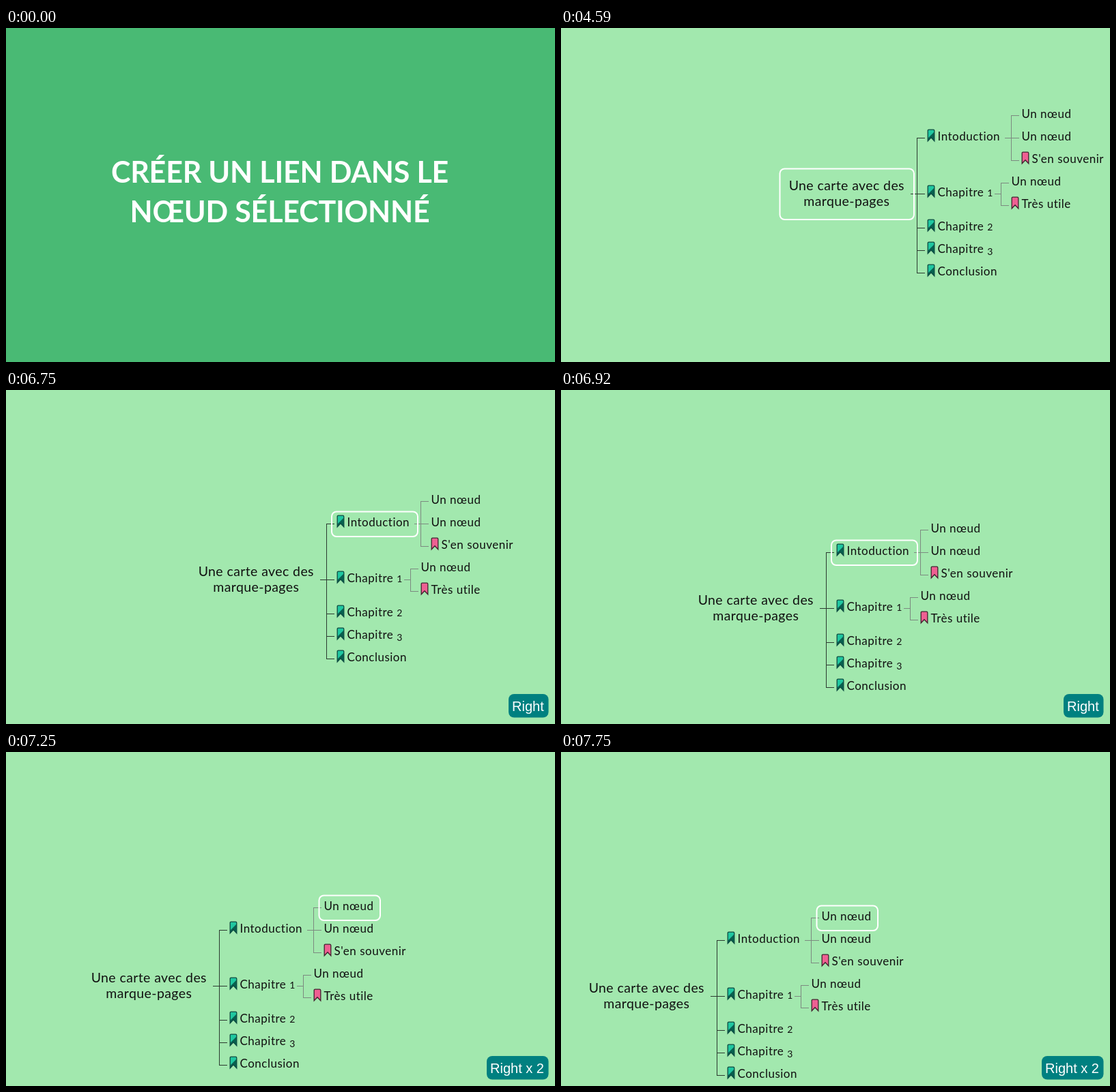
These frames come from a looping animation (804x490 px, 8 s). An HTML page:

```html
<!DOCTYPE html>
<html lang="fr">
<head>
<meta charset="utf-8">
<title>Créer un lien</title>
<style>
  html, body { margin: 0; width: 100%; height: 100%; overflow: hidden; background: #49ba74; }
  svg { display: block; width: 804px; height: 490px; }
  text { font-family: Lato, "Open Sans", sans-serif; white-space: pre; }
  .title { font-weight: 700; fill: #fff; text-anchor: middle; }
  .caps { font-size: 43px; letter-spacing: -.2px; }
  .lower { font-size: 46px; letter-spacing: .1px; }
  .node { font-size: 17px; letter-spacing: .5px; fill: #111; }
  .digit { font-size: 14px; }
  .root { font-size: 19.5px; letter-spacing: .4px; fill: #111; text-anchor: middle; }
  .line { fill: none; stroke-width: 1; shape-rendering: crispEdges; }
  .frame { fill: none; stroke: #fff; stroke-width: 2; }
  #label { font: 20px "Liberation Sans", Arial, sans-serif; fill: #fff; }
</style>
</head>
<body>
<svg viewBox="0 0 804 490">
  <defs>
    <g id="ribbon">
      <path d="M.7 2.2Q.7.7 2.2.7H8.8Q10.3.7 10.3 2.2V17.3L5.5 12.3.7 17.3Z"/>
    </g>
    <g id="green">
      <use href="#ribbon" fill="#1fc7a0"/>
      <path d="M10 4V16.5L5.5 12 1 16.5V13Z" fill="#08604f"/>
      <use href="#ribbon" fill="none" stroke="#0b4a40" stroke-width="1.3"/>
    </g>
    <g id="pink">
      <use href="#ribbon" fill="#ee5f92" stroke="#43202e" stroke-width="1.3"/>
    </g>
  </defs>
  <g id="intro">
    <text class="title caps" x="401" y="227">CRÉER UN LIEN DANS LE</text>
    <text class="title caps" x="401" y="284.5">NŒUD SÉLECTIONNÉ</text>
  </g>
  <g id="command">
    <text class="title lower" x="401" y="218.5">Commande</text>
    <text class="title lower" x="401" y="276">Créer un lien vers un marque-page</text>
  </g>
  <g id="scene">
    <rect width="804" height="490" fill="#a2e8ae"/>
    <g id="map">
      <path class="line" stroke="#2c3a30" d="M512 243.5H533M533 161.5H521.5V359.5H533M521 293.5H533M521 326.5H533"/>
      <path class="line" stroke="#7c8a80" d="M650 161.5H671M671 128.5H659.5V194.5H671M635 243.5H644M656 227.5H644.5V260.5H656"/>
      <text class="root" x="418.3" y="238">Une carte avec des</text>
      <text class="root" x="418.3" y="261">marque-pages</text>
      <g id="nodes"></g>
      <rect id="frame" class="frame" rx="7"/>
    </g>
    <g id="badge">
      <rect id="plate" y="446" height="34.5" rx="8" fill="#008080"/>
      <text id="label" y="471"></text>
    </g>
  </g>
</svg>
<script>
const $ = id => document.getElementById(id);
const show = (id, on) => $(id).style.display = on ? "" : "none";
const set = (id, attrs) => { for (const k in attrs) $(id).setAttribute(k, attrs[k]); };

// left edge, baseline, label, bookmark
const nodes = [
  [537, 165, "Intoduction", "green"],
  [537, 247, "Chapitre 1", "green"],
  [537, 297, "Chapitre 2", "green"],
  [537, 330, "Chapitre 3", "green"],
  [537, 363, "Conclusion", "green"],
  [675, 132, "Un nœud"],
  [675, 165, "Un nœud"],
  [675, 198, "S'en souvenir", "pink"],
  [660, 231, "Un nœud"],
  [660, 264, "Très utile", "pink"],
];

// old-style numerals: small, the 3 hangs below the line
const numerals = s => s.replace(/\d/, d => `<tspan class="digit" dy="${d === "3" ? 3 : 0}">${d}</tspan>`);

$("nodes").innerHTML = nodes.map(([x, y, label, mark]) =>
  (mark ? `<use href="#${mark}" x="${x - .5}" y="${y - 16.5}"/>` : "") +
  `<text class="node" x="${x + (mark ? 15 : 0) - .5}" y="${y}">${numerals(label)}</text>`).join("");

const frames = [
  { x: 320.5, y: 206.5, width: 196.5, height: 74.5 },
  { x: 529, y: 143.5, width: 126, height: 36.5 },
  { x: 667.5, y: 110.5, width: 89.5, height: 36.5 },
];
const badges = [null, ["Right", 736], ["Right x 2", 704]];

// map scroll, one entry per step
const LOOP = 8000, SCROLL = 6590, STEP = 82.5;
const left = [25, 52, 79, 106, 133, 155, 171, 183, 209, 233, 252, 267, 278, 287, 293];
const down = [17, 35, 52, 66, 77, 81, 83, 84, 100, 108, 111, 113, 114, 115, 115];

function draw(t) {
  show("intro", t < 500);
  show("command", t >= 500 && t < 4590);
  show("scene", t >= 4590);

  const step = Math.min(Math.floor((t - SCROLL) / STEP), left.length - 1);
  const presses = step < 0 ? 0 : step < 8 ? 1 : 2;
  const dx = step < 0 ? 0 : -left[step], dy = step < 0 ? 0 : down[step];
  set("map", { transform: `translate(${dx} ${dy})` });
  set("frame", frames[presses]);

  show("badge", presses);
  if (presses) {
    const [label, x] = badges[presses];
    set("plate", { x, width: 794.5 - x });
    set("label", { x: x + 5 });
    $("label").textContent = label;
  }
}

function tick() {
  draw(performance.now() % LOOP);
  requestAnimationFrame(tick);
}
tick();
</script>
</body>
</html>
```
